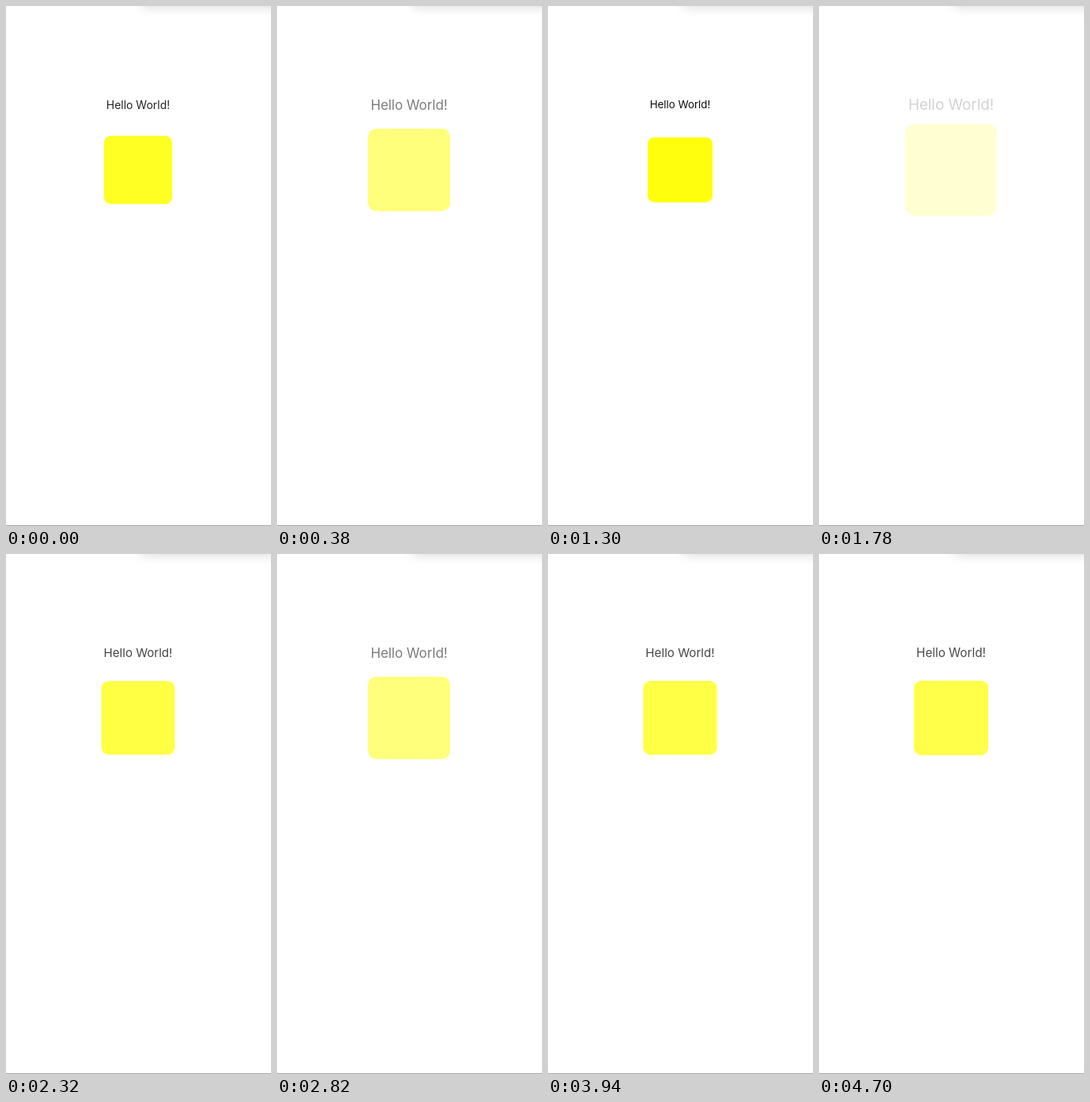
An HTML page for the animation above (4.74 s loop, 335x656 px).

```html
<!DOCTYPE html>
<html lang="en">
<head>
<meta charset="utf-8">
<style>
  html, body { margin: 0; width: 100%; height: 100%; overflow: hidden; background: #fff; }
  svg { display: block; }
  text { font: 13px Inter, "Liberation Sans", sans-serif; text-anchor: middle; }
</style>
</head>
<body>
<svg width="335" height="656" viewBox="0 0 335 656">
  <defs>
    <filter id="blur" x="-20%" y="-200%" width="140%" height="500%"><feGaussianBlur stdDeviation="7"/></filter>
  </defs>
  <rect x="171" y="-20" width="200" height="22" opacity=".13" filter="url(#blur)"/>
  <rect y="655" width="335" height="1" fill="#a8a8a8"/>
  <g class="pulse" data-y="124.7"><text y="4.6">Hello World!</text></g>
  <g class="pulse" data-y="206.7"><rect x="-40" y="-40" width="80" height="80" rx="8" fill="#ff0"/></g>
</svg>
<script>
  const LOOP = 4740, SHRINK = 520, GROW = 480;
  // Each tap reverses the pulse, starting with a shrink already under way.
  const taps = [-415, 130, 815, 1370, 2005, 2570, 3260, 3810, 4400];
  const parts = document.querySelectorAll('.pulse');
  const ease = u => u + .3 * u * (1 - u);

  function progress(t) {
    const i = taps.findLastIndex(tap => tap <= t);
    const growing = i % 2 === 1;
    const u = ease(Math.min(1, (t - taps[i]) / (growing ? GROW : SHRINK)));
    return growing ? u : 1 - u;
  }

  function draw(now) {
    const p = progress(now % LOOP);
    const fade = p - .8 * p * p * (1 - p);
    for (const part of parts) {
      part.setAttribute('transform', `translate(167 ${part.dataset.y}) scale(${1 + p / 2})`);
      part.setAttribute('opacity', Math.max(.04, 1 - fade));
    }
  }

  const begin = performance.now();
  function tick() {
    draw(performance.now() - begin);
    requestAnimationFrame(tick);
  }
  tick();
</script>
</body>
</html>
```
